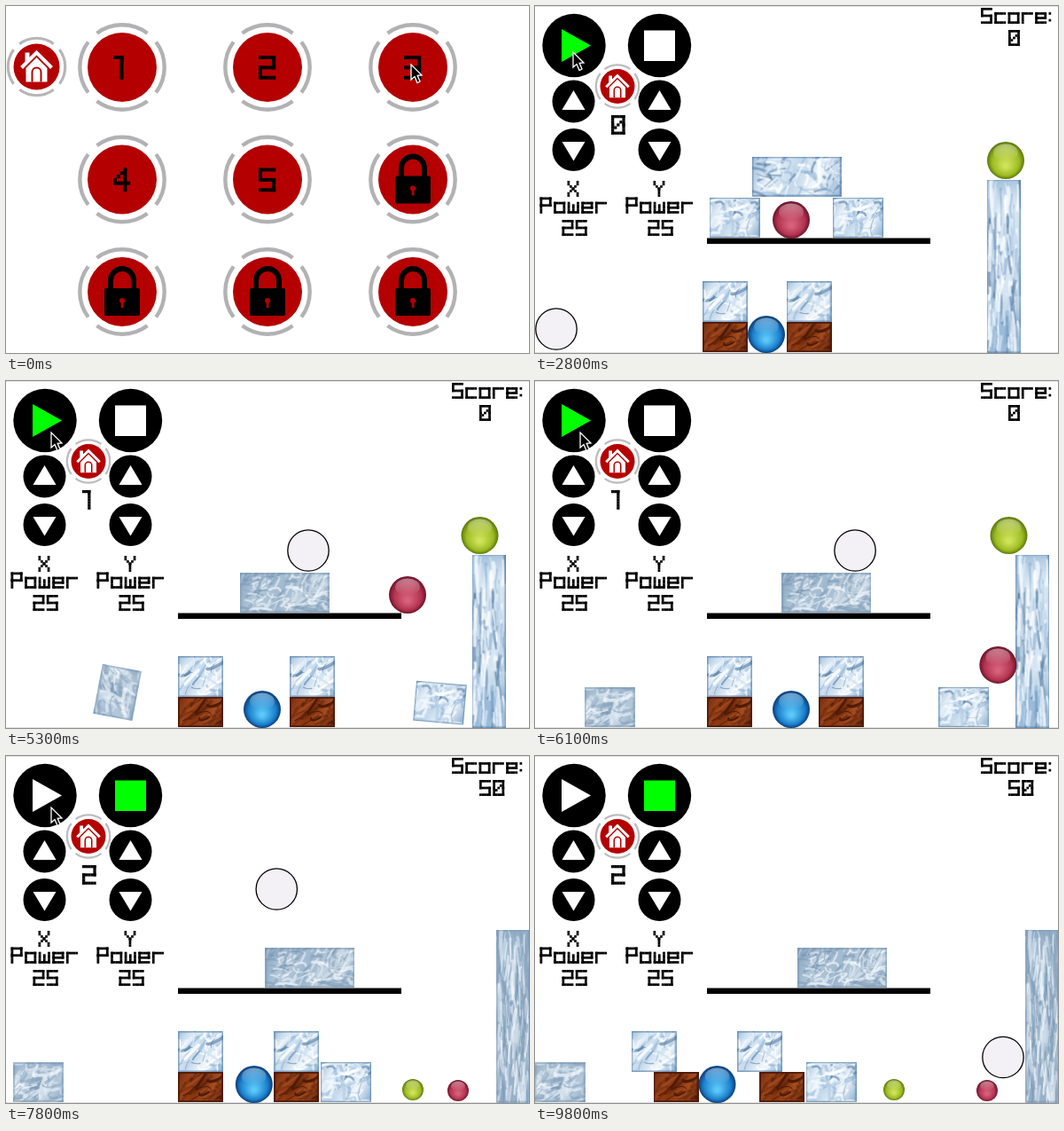
Animation of 590 by 391 pixels, one loop 9.9 s. Source, as an HTML page with a canvas:

```html
<!DOCTYPE html>
<html lang="en">
<head>
<meta charset="utf-8">
<title>Ice tower game</title>
<style>
  html, body { margin: 0; width: 100%; height: 100%; overflow: hidden; background: #fff; }
  canvas { display: block; width: 590px; height: 391px; }
</style>
</head>
<body>
<canvas id="stage" width="590" height="391" role="img" aria-label="Level menu, then a ball game with Score, X Power and Y Power"></canvas>
<script>
const LOOP = 9900, STEP = 100, GAME = 400, SHOT1 = 2910, HIT = 3640, SHOT2 = 6537, LAND = 7300;
const RED = '#b40000', GREEN = '#00ff00';
const g = document.getElementById('stage').getContext('2d');

// Lettering: every sign is a set of bars on a 5 x 7 cell grid
const flat = (y, to = 4) => [0, y, to, y];
const tall = (x, top, end) => [x, top, x, end];
const spoke = (x, y) => [2, 3, x, y];
const BARS = {
  a: flat(0), g: flat(3), d: flat(6), m: flat(2), u: flat(4), i: flat(0, 2),
  f: tall(0, 0, 3), e: tall(0, 3, 6), b: tall(4, 0, 3), c: tall(4, 3, 6),
  h: tall(0, 2, 6), n: tall(4, 2, 6), x: tall(4, 2, 4), j: tall(2, 0, 6), k: tall(2, 3, 6), v: tall(3, 0, 6),
  s: [1, 4, 3, 2], p: [3, 0, 0, 3],
  q: spoke(0, 0), r: spoke(4, 0), y: spoke(0, 6), z: spoke(4, 6),
  t: tall(0, 2, 2), o: tall(0, 5, 5)
};
const SIGNS = {
  0: 'abcdefs', 1: 'ij', 2: 'abged', 3: 'abgcd', 4: 'puv', 5: 'afgcd', 6: 'afgcde', 7: 'abc', 8: 'abcdefg', 9: 'abcdfg',
  S: 'afgcd', P: 'abgfe', c: 'mhd', o: 'mhnd', r: 'hm', e: 'mhdux', w: 'hndk', X: 'qryz', Y: 'qrk', ':': 'to'
};

function label(text, x, y, u) {
  g.fillStyle = '#000';
  for (const ch of String(text)) {
    for (const bar of SIGNS[ch]) {
      let [cx, cy, ex, ey] = BARS[bar];
      for (;;) {
        g.fillRect(x + cx * u, y + cy * u, u + .15, u + .15);
        if (cx === ex && cy === ey) break;
        cx += Math.sign(ex - cx);
        cy += Math.sign(ey - cy);
      }
    }
    x += u * (ch === '1' ? 4 : 6);
  }
}

const arc = k => 4 * k * (1 - k);
const rampAt = t => (from, to, power = 1) =>
  Math.min(1, Math.max(0, (t - from) / (to - from))) ** power;

// Motion rules; r(from, to, power) grows from 0 to 1 between two times
function thrown(ms) {
  const k = ms / 100;
  return [24 + 24 * k, 364 - 152 * k + 17.65 * k * k];
}

function whiteBall(t, r) {
  if (t < SHOT1) return [24, 335 + 29 * r(GAME, 1000)];
  if (t < HIT) return thrown(t - SHOT1);
  if (t < SHOT2) return [199 + 142 * r(HIT, 5300) + 31 * r(5300, SHOT2), 191 - 55 * arc(r(HIT, 4400))];
  if (t < LAND) return thrown(t - SHOT2);
  return [206 + 278 * r(LAND, 8700) + 44 * r(8700, 9200),
    235 - 85 * arc(r(LAND, 8300)) + 104.5 * r(8400, 9100)];
}

const pointer = r => [
  457 - 413 * r(800, 1100) + 97 * r(1700, 1900) - 98 * r(2600, 2800) + 8 * r(4000, 4300) + 150 * r(8700, 9200),
  66 + 36 * r(800, 1100) - 50 * r(2600, 2800) + 6 * r(4000, 4300) - 90 * r(8700, 9200)
];

const leftIce = r => [
  225 - 35 * r(HIT, 4600) - 92 * r(4600, 5600) - 70 * r(5600, 8100),
  238.5 + 129 * r(4600, 5350, 2),
  -180 * r(4600, 5600, 2.3)
];

function rightIce(r) {
  const tilt = 30 * Math.sin(Math.PI * r(4400, 5350));
  const push = 1 - (1 - r(6800, 9200)) ** 2;
  return [364.5 + 125 * r(3700, 4900) - 10.5 * r(5300, 6800) - 145 * push,
    238.5 + 129 * r(4450, 5000, 2) - tilt, tilt];
}

const slab = r => [
  295 + 19 * r(HIT, 5300) + 28 * r(5300, 6800) + 4.5 * r(7700, 8200),
  192 + 46.5 * r(3900, 4400, 2),
  8 * arc(r(HIT, 4400))
];

const redBall = r => [
  289 + 164 * r(3700, 5300) + 78 * r(5300, 6200) - 21 * r(6900, 7800),
  241 + 100 * r(5350, 6300) + 28 * r(6800, 6900) + 8 * r(6900, 7000),
  21 - 9 * r(6900, 7000)
];

const greenBall = r => [
  531 + 3.5 * r(4600, 5300) - 10.5 * r(6200, 6800) - 29 * r(6800, 7400) - 90 * r(7400, 8400),
  170 + 4 * r(GAME, 1000) + 195 * r(6400, 7400, 2) + 7 * r(7300, 7400),
  21 - 9 * r(7300, 7400)
];

function random(seed) {
  return () => (seed = (seed * 16807) % 2147483647) / 2147483647;
}

// A gradient crossed by random curved streaks
function texture(w, h, seed, stops, inks, gap, spread) {
  const c = document.createElement('canvas'), p = c.getContext('2d'), rnd = random(seed);
  c.width = w;
  c.height = h;
  const fill = p.createLinearGradient(0, 0, w, h * .8);
  stops.forEach((s, i) => fill.addColorStop(i / (stops.length - 1), s));
  p.fillStyle = fill;
  p.fillRect(0, 0, w, h);
  const upright = h > 2 * w;
  for (let i = 0; i < w * h / gap; i++) {
    const x = rnd() * w, y = rnd() * h, len = (6 + rnd() * 18) * (upright ? 2 : 1);
    const turn = (upright ? 1.57 : -.6) + (rnd() - .5) * (upright ? .3 : spread);
    const bend = (rnd() - .5) * (upright ? 6 : 16);
    const dx = Math.cos(turn) * len, dy = Math.sin(turn) * len;
    p.strokeStyle = inks[Math.floor(rnd() * inks.length)];
    p.lineWidth = .6 + rnd() * 3.4;
    p.lineCap = 'round';
    p.beginPath();
    p.moveTo(x, y);
    p.quadraticCurveTo(x + dx / 2 + bend, y + dy / 2 - bend, x + dx, y + dy);
    p.stroke();
  }
  p.strokeStyle = inks[0];
  p.strokeRect(.5, .5, w - 1, h - 1);
  return c;
}

const ice = (w, h, seed) => texture(w, h, seed,
  ['#9dbcd9', '#e6f0f8', '#c3d8eb', '#f3f8fc', '#9bbbd8'],
  ['#4a749e90', '#ffffffd0', '#f2f8fcd0', '#d0e2f1d0', '#b4cee5b0', '#86abcf80'], 45, 2.4);
const frost = (w, h, seed) => texture(w, h, seed,
  ['#88a5c0', '#b5c9db', '#9fb8ce', '#c3d3e1', '#97b1c9'],
  ['#7895b180', '#e4edf5b0', '#d0deeab0', '#88a5bf90', '#f2f6fab0'], 32, 2);
const clay = texture(51, 34, 77,
  ['#6f2a0d', '#9b431a', '#86350f', '#a44c20', '#6a270b'],
  ['#4e1b08', '#b2582a60', '#5a1f0860', '#8f3c1560', '#3f150540'], 30, 1.4);

const cube = ice(51, 46, 67);
const [small, smallHit] = [ice, frost].map(make => make(57, 45, 11));
const [wide, wideHit] = [ice, frost].map(make => make(101, 45, 37));
const [pillar, pillarHit] = [ice, frost].map(make => make(38, 195, 53));

function disc(x, y, r, color) {
  g.fillStyle = color;
  g.beginPath();
  g.arc(x, y, r, 0, 7);
  g.fill();
}

function shape(color, ...pts) {
  g.fillStyle = color;
  g.beginPath();
  pts.forEach(([x, y]) => g.lineTo(x, y));
  g.closePath();
  g.fill();
}

function ring(x, y, r, width, color) {
  g.strokeStyle = color;
  g.lineWidth = width;
  for (let mid = 0; mid < 6; mid += Math.PI / 2) {
    g.beginPath();
    g.arc(x, y, r, mid - .64, mid + .64);
    g.stroke();
  }
}

function home(x, y, r, color) {
  ring(x, y, r * 1.24, r * .12, color);
  disc(x, y, r, RED);
  g.save();
  g.translate(x, y);
  g.scale(r / 26, r / 26);
  g.fillStyle = '#fff';
  g.fillRect(-13, -16, 5, 12);
  shape('#fff', [0, -12], [12, 0], [12, 17], [-12, 17], [-12, 0]);
  for (const [color, width, dy] of [[RED, 2, 4], ['#fff', 4, 0]]) {
    g.strokeStyle = color;
    g.lineWidth = width;
    g.beginPath();
    g.moveTo(-17, 1 + dy);
    g.lineTo(0, -16 + dy);
    g.lineTo(17, 1 + dy);
    g.stroke();
  }
  g.strokeStyle = RED;
  g.lineWidth = 2;
  g.beginPath();
  g.moveTo(-5, 17);
  g.arc(0, 6, 5, Math.PI, 0);
  g.lineTo(5, 17);
  g.stroke();
  g.restore();
}

function lock(x, y) {
  g.strokeStyle = g.fillStyle = '#000';
  g.lineWidth = 6;
  g.beginPath();
  g.moveTo(x - 13, y);
  g.arc(x, y - 13, 13, Math.PI, 0);
  g.lineTo(x + 13, y);
  g.stroke();
  g.beginPath();
  g.roundRect(x - 20, y - 4, 40, 31, 2);
  g.fill();
  disc(x, y + 10, 3, RED);
  g.fillRect(x - 1.3, y + 11, 2.8, 7);
}

function menu() {
  home(34.5, 68.5, 26, '#b6b6b8');
  for (let i = 0; i < 9; i++) {
    const x = 131 + 164 * (i % 3), y = 69 + 126.5 * Math.floor(i / 3);
    ring(x, y, 47.7, 4.4, '#b2b2b4');
    disc(x, y, 39, RED);
    if (i < 5) label(i + 1, x - 10, y - 13, 3.8);
    else lock(x, y);
  }
}

function block(img, [x, y, turn = 0]) {
  g.save();
  g.translate(x, y);
  g.rotate(turn * Math.PI / 180);
  g.drawImage(img, -img.width / 2, -img.height / 2);
  g.restore();
}

function marble([x, y, r], light, mid, dark) {
  const body = g.createRadialGradient(x, y + r * .3, r * .1, x, y, r);
  body.addColorStop(0, light);
  body.addColorStop(.7, mid);
  body.addColorStop(1, dark);
  disc(x, y, r, body);
  const shine = g.createLinearGradient(0, y - r * .9, 0, y);
  shine.addColorStop(0, '#ffffff70');
  shine.addColorStop(1, '#ffffff00');
  g.fillStyle = shine;
  g.beginPath();
  g.ellipse(x, y - r * .42, r * .66, r * .46, 0, 0, 7);
  g.fill();
}

function panel(x, name, power) {
  disc(x, 107.5, 24, '#000');
  shape('#fff', [x, 95], [x + 13, 117], [x - 13, 117]);
  disc(x, 162, 24, '#000');
  shape('#fff', [x, 174.5], [x + 13, 153], [x - 13, 153]);
  label(name, x - 7, 197, 2.55);
  label('Power', x - 38, 215.5, 2.6);
  label(Math.round(power), x - 13, 241, 2.55);
}

function controls(t, r) {
  const done = t >= SHOT2;
  disc(44, 44.5, 35.7, '#000');
  shape(done ? '#fff' : GREEN, [30, 26], [63, 44.5], [30, 63]);
  disc(140.5, 44.5, 35.7, '#000');
  g.fillStyle = done ? GREEN : '#fff';
  g.fillRect(123, 27.5, 35, 34.5);
  panel(43.5, 'X', 15 + 10 * r(1100, 1700));
  panel(140.5, 'Y', 10 + 15 * r(1900, 2600));
  home(93, 90.5, 19.5, '#bdbdc0');
  label((t >= SHOT1) + done, 86, 123, 3.1);
  label('Score:', 503, 2, 2.55);
  label(25 * ((t >= 7000) + (t >= 7400)), 534, 27, 2.55);
}

function game(t, r) {
  g.fillStyle = '#e0e0e0';
  g.fillRect(0, 0, 590, 1);
  g.fillRect(0, 390, 590, 1);

  const [bx, by] = whiteBall(t, r);
  disc(bx, by, 23.2, t < 1000 ? '#fff' : '#f3f1f5');
  g.strokeStyle = '#000';
  g.lineWidth = 1.3;
  g.stroke();

  g.fillStyle = '#000';
  g.fillRect(194, 261.5, 252, 6.5);

  // The sliding ice shoves the row on the floor to the left
  const pusher = rightIce(r), coast = 25 * r(8700, 9500);
  const clayR = Math.min(345.5, pusher[0] - 55.5);
  const blue = Math.min(289, clayR - 48) - coast;
  const clayL = Math.min(219.5, blue - 46.5);
  block(clay, [clayL, 373]);
  block(cube, [clayL - coast, 333]);
  block(clay, [clayR, 373]);
  block(cube, [clayR - coast, 333]);
  block(small, pusher);

  block(t < LAND ? pillar : pillarHit, [528.5 + 16 * r(4600, 5300) + 27.5 * r(5300, 6600), 293]);
  block(t < HIT ? small : smallHit, leftIce(r));
  block(t < HIT ? wide : wideHit, slab(r));
  marble([blue, 370, 21], '#5cc8f8', '#1b80cc', '#0a3d78');
  marble(redBall(r), '#d8617a', '#b23350', '#6b132b');
  marble(greenBall(r), '#cfe35a', '#9cba22', '#5c780c');
  controls(t, r);
}

function arrow([x, y]) {
  g.save();
  g.translate(x, y);
  shape('#000', [0, 0], [0, 17], [4, 13.5], [7, 20.5], [10, 19], [7.2, 12.3], [12, 12]);
  g.strokeStyle = '#fff';
  g.lineWidth = 1.3;
  g.stroke();
  g.restore();
}

function draw(now) {
  const t = Math.floor((now % LOOP) / STEP) * STEP, r = rampAt(t);
  g.fillStyle = '#fff';
  g.fillRect(0, 0, 590, 391);
  if (t < GAME) menu();
  else game(t, r);
  arrow(pointer(r));
}

let start;
function tick(now) {
  start ??= now;
  draw(now - start);
  requestAnimationFrame(tick);
}
draw(0);
requestAnimationFrame(tick);
</script>
</body>
</html>
```
